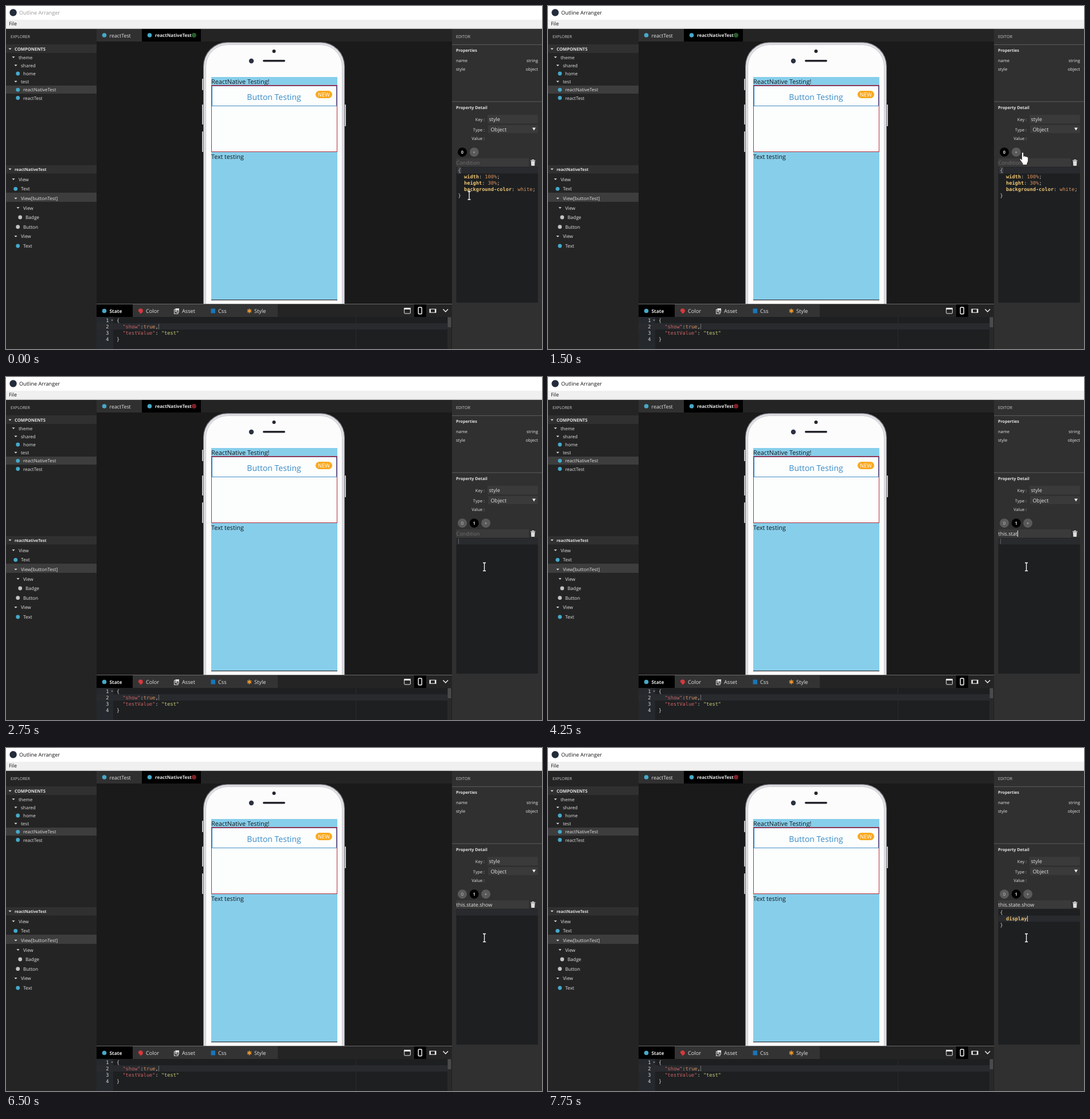
An HTML page for the animation above (8 s loop, 935 by 599 pixels).

```html
<!DOCTYPE html>
<html lang="en">
<head>
<meta charset="utf-8">
<title>Outline Arranger</title>
<style>
html, body { margin: 0; width: 100%; height: 100%; overflow: hidden; background: #1a1a1a; }
svg { display: block; width: 100vw; height: 100vh; }
text { font-family: "Open Sans", "Noto Sans", sans-serif; text-rendering: geometricPrecision; white-space: pre; fill: #e4e4e4; }
.b { font-weight: 700; }
.code text { font: 8.65px "DejaVu Sans Mono", monospace; fill: #d5d8d6; }
.code .key { font-weight: 700; fill: #f0c674; }
.code .val { fill: #de935f; }
.code .red { fill: #cc6666; }
.code .str { fill: #c9cf78; }
.hide { display: none; }
</style>
</head>
<body>
<svg id="stage" viewBox="0 0 935 599" preserveAspectRatio="none"></svg>
<script>
const rect = (x, y, w, h, fill, more = '') =>
  `<rect x="${x}" y="${y}" width="${w}" height="${h}" fill="${fill}" ${more}/>`;
const dot = (x, y, r, fill, more = '') => `<circle cx="${x}" cy="${y}" r="${r}" fill="${fill}" ${more}/>`;
const text = (x, y, size, str, more = '') => `<text x="${x}" y="${y}" font-size="${size}" ${more}>${str}</text>`;
const path = (d, more) => `<path d="${d}" ${more}/>`;
const fill = color => `style="fill:${color}"`;
const bold = 'class="b"', end = 'text-anchor="end"', mid = 'text-anchor="middle"';
const fold = (x, y) => path(`M${x - 2.6} ${y - 1.3}h5.2l-2.6 2.8z`, 'fill="#ddd"');
const blue = '#46a9c9', pale = '#c4c4c4';

// Each row: indent, centre y, label, icon colour (none means a folding arrow)
const tree = (rows, size) => rows.map(([x, y, label, icon]) =>
  (icon ? dot(x - 9.3, y, 3.4, icon) : fold(x - 9, y)) + text(x, y + 3, size, label)).join('');

const titleBar = () =>
  rect(0, 0, 935, 24, '#fff') + rect(0, 24, 935, 16, '#f0f0f0') + rect(0, 38.5, 935, 1.5, '#d4d4d4') +
  dot(12.5, 11.5, 6.2, '#232c3b') +
  text(23, 15, 9.1, 'Outline Arranger', 'id="title"') +
  text(5, 34.3, 8.9, 'File', fill('#111'));

const explorer = () =>
  rect(0, 40, 158, 559, '#242424') + text(8, 55.8, 7.05, 'EXPLORER', fill('#ccc')) +
  rect(0, 67, 158, 15, '#303030') + fold(7, 75) + text(15, 77.6, 7.6, 'COMPONENTS', bold) +
  rect(0, 139, 158, 14, '#3d3d3d') +
  tree([[22, 89.5, 'theme'], [26, 103.7, 'shared'], [30, 118, 'home', blue], [26, 132, 'test'],
    [30, 146.3, 'reactNativeTest', blue], [30, 160.5, 'reactTest', blue]], 8) +
  rect(0, 278, 158, 14.5, '#303030') + fold(7, 285) + text(15, 287.8, 7, 'reactNativeTest', bold) +
  rect(0, 326, 158, 16, '#3d3d3d') +
  tree([[22, 302.6, 'View'], [26, 319.3, 'Text', blue], [26, 336, 'View[buttonTest]'], [30, 352.5, 'View'],
    [34, 369, 'Badge', pale], [30, 385.7, 'Button', pale], [26, 402.3, 'View'], [30, 419, 'Text', blue]], 8.2);

const phone = () =>
  rect(342, 127, 4, 20, '#c8c8cc', 'rx="1"') + rect(342, 172, 4, 35, '#c8c8cc', 'rx="1"') +
  rect(342, 219, 4, 36, '#c8c8cc', 'rx="1"') + rect(589, 172, 4, 38, '#c8c8cc', 'rx="1"') +
  rect(344, 63, 247, 560, '#85858c', 'rx="42"') +
  rect(345.2, 64.4, 244.6, 560, '#e3e3e7', 'rx="41"') +
  rect(348.5, 67.5, 238, 560, '#fcfcfd', 'rx="38" stroke="#c3c3ca"') +
  dot(467.5, 79, 3, '#24262c') + dot(428, 96, 4.2, '#2b3142') + rect(448, 94, 39, 3.6, '#24262c', 'rx="1.8"') +
  rect(358, 124, 220, 389, '#87ceeb') + rect(358, 512.8, 220, 1.2, '#333') +
  text(358, 136, 10.85, 'ReactNative Testing!', fill('#151515')) +
  rect(358.5, 138.5, 219, 116, '#fcfdfd', 'stroke="#b52f38"') +
  rect(359.5, 139.5, 217, 35, 'none', 'stroke="#3f8fc4"') +
  path('M359 139.5H577V173', 'fill="none" stroke="#64407c"') +
  text(467.5, 163.8, 14, 'Button Testing', `${mid} ${fill('#388bc6')}`) +
  rect(540, 148, 29, 13, '#f9a81f', 'rx="6.5"') +
  text(554.5, 157.9, 9.3, 'NEW', `${mid} ${fill('#fff')}`) +
  text(358, 267.3, 10.7, 'Text testing', fill('#151515'));

const workspace = () =>
  rect(158, 40, 620, 480, '#1a1a1a') + rect(158, 40, 620, 22, '#242424') + rect(158, 40, 79, 22, '#303030') +
  rect(237, 40, 103, 22, '#000') +
  dot(171.5, 51, 3.8, blue) + text(180.5, 54.5, 8.85, 'reactTest') +
  dot(250.5, 51, 3.8, blue) + text(260, 54.3, 8.05, 'reactNativeTest', bold) +
  dot(328, 51, 4, '#285c2c', 'id="status"') + phone();

const line = (x, y, parts) => `<text x="${x}" y="${y}">` +
  parts.map(([str, cls]) => `<tspan class="${cls || ''}">${str}</tspan>`).join('') + '</text>';

const statePanel = () =>
  rect(158, 520, 620, 79, '#242424') + rect(158, 520, 620, 1, '#6a6a6a') +
  rect(221, 521, 253, 22, '#333') + rect(158, 521, 63, 22, '#000') +
  dot(171.5, 532.5, 3.8, blue) + text(180.5, 535.7, 8.4, 'State', bold) +
  path('M231 530q3-3 7-.5q2 4-1 6.5q-3 2-4-.5q.5-2-2-2z', 'fill="#d7393d"') + text(244, 536, 9.2, 'Color') +
  rect(293.5, 530, 6.5, 7.5, 'none', 'stroke="#ddd"') + rect(295.5, 528, 6.5, 7, '#ddd') +
  path('M296.5 534l2-3 1.2 1.5 1-1 1 2.5z', 'fill="#444"') + text(307, 536, 9.2, 'Asset') +
  rect(357.5, 528.5, 7.5, 8, '#1976b8') + text(370, 536, 9.2, 'Css') +
  path('M424.5 528.5v8M421 530.5l7 4M428 530.5l-7 4', 'stroke="#f39a2b" stroke-width="1.7"') +
  text(433, 536, 9.2, 'Style') +
  rect(712, 521, 21, 22, '#000') +
  rect(694.8, 527.5, 10.6, 9.5, 'none', 'stroke="#eee" rx="1"') + rect(694.5, 527, 11.2, 3, '#eee') +
  rect(719.3, 526.3, 6, 11.4, 'none', 'stroke="#fff" stroke-width="1.4" rx="1"') +
  rect(739, 529.3, 11, 6, 'none', 'stroke="#eee"') + rect(739, 529.3, 2, 6, '#eee') + rect(748, 529.3, 2, 6, '#eee') +
  path('M762.5 529.5l4.3 4.5 4.3-4.5', 'fill="none" stroke="#eee" stroke-width="1.5"') +
  rect(158, 543, 620, 56, '#1d1f21') + rect(158, 543, 29, 56, '#25282c') +
  rect(158, 554, 612, 11, '#282a2e') + rect(610, 543, 1, 56, '#292b2e') +
  rect(770, 543, 7, 56, '#292929') + rect(770.5, 543.5, 6, 17.5, '#4b4b4b') +
  '<g class="code">' +
  [1, 2, 3, 4].map(n => `<text x="174.3" y="${541 + 11.1 * n}" class="b">${n}</text>`).join('') +
  line(193, 552.1, [['{']]) +
  line(203.4, 563.2, [['"show"', 'red'], [':'], ['true', 'val'], [',']]) +
  line(203.4, 574.3, [['"testValue"', 'red'], [': '], ['"test"', 'str']]) +
  line(193, 585.4, [['}']]) + '</g>' +
  path('M183 547.8h4l-2 2.4z', 'fill="#888"') + rect(266, 555, 1, 9.5, '#777');

const knob = (x, label, on) => dot(x, 255.2, 8, on ? '#000' : '#5a5a5a') +
  text(x, 258, 7.5, label, `${mid} ${on ? bold : fill('#ccc')}`);

const decl = (y, name, value) => line(799, y, [[name, 'key'], [': '], [value, 'val'], [';']]);

const editor = () =>
  rect(778, 40, 157, 559, '#303030') + text(785, 55.8, 7.1, 'EDITOR', fill('#ccc')) +
  rect(778, 67, 157, 1, '#5c5c5c') + rect(778, 166.5, 157, 1, '#5c5c5c') +
  text(785, 80.2, 7.1, 'Properties', bold) +
  text(785, 97.8, 7.5, 'name') + text(928, 97.8, 7.5, 'string', end) +
  text(785, 113, 7.5, 'style') + text(928, 113, 7.5, 'object', end) +
  text(785, 179.8, 7.2, 'Property Detail', bold) +
  text(835, 200.5, 7.4, 'Key :', end) + text(835, 218.6, 7.4, 'Type :', end) + text(835, 233.6, 7.4, 'Value :', end) +
  rect(840, 190, 88, 15, '#3a3a3a') + text(842.5, 200.8, 9, 'style') +
  rect(841, 208, 87, 14, '#3a3a3a') + text(845.5, 219, 9.1, 'Object') +
  path('M918 212.5h6l-3 5z', 'fill="#eee"') +
  rect(785, 266, 127, 14.5, '#3a3a3a') +
  path('M915 269.2h8.4v1.2H915zM917.5 268h3.4v1.4h-3.4zM915.8 271h6.8l-.5 8h-5.8z', 'fill="#ddd"') +
  rect(785.5, 281, 142.5, 237, '#1d1f21') +
  rect(785.5, 281.5, 142.5, 11, '#282a2e', 'id="active"') +
  '<g id="before" class="code">' + rect(788.5, 282, 5, 10, 'none', 'stroke="#484b50"') +
  line(788.5, 290, [['{']]) + decl(301.1, 'width', '100%') + decl(312.2, 'height', '30%') +
  decl(323.3, 'background-color', 'white') + line(788.5, 334.4, [['}']]) + '</g>' +
  `<g id="knobsBefore">${knob(796, '0', true) + knob(816.7, '+')}</g>` +
  `<g id="knobsAfter">${knob(796, '0') + knob(816.7, '1', true) + knob(837, '+')}</g>` +
  text(785.5, 277, 9, '', 'id="condition"') + rect(0, 268, 1, 11, '#eee', 'id="conditionCaret"') +
  '<g class="code"><text id="open" x="788.5" y="290"></text><text id="word" x="799" y="301.1"></text>' +
  '<text id="close" x="788.5" y="312.2"></text></g>' + rect(0, 0, 1, 10, '#777', 'id="codeCaret"');

const pointers = () =>
  `<g id="beam">${path('M-2.5-7h2l.5.6.5-.6h2M0-6.4V6.4M-2.5 7h2l.5-.6.5.6h2', 'fill="none" stroke="#fff" stroke-width="1.3"')}</g>` +
  `<g id="arrow">${path('M0 0v15.5l3.6-3.4 2.5 5.8 2.5-1.1-2.5-5.6h5z', 'fill="#fff" stroke="#111" stroke-width=".8"')}</g>` +
  `<g id="hand">${path('M-1.6 1q1.6-2 3.2 0v6q2-1.5 3 .5q2-1 2.7.7q2-.6 2.3 1.2v6l-1.8 4v2.6H-.2V19.5l-5-7q.5-2.4 2.6-1l1 1.4z',
    'fill="#fff" stroke="#111" stroke-width=".8"')}</g>`;

const stage = document.getElementById('stage');
stage.innerHTML = workspace() + explorer() + statePanel() + editor() + titleBar() + pointers();
const $ = id => document.getElementById(id);
const show = (id, on) => $(id).classList.toggle('hide', !on);

const pointerSteps = [[0, 'beam', 808, 331], [500, 'arrow', 822, 292], [750, 'arrow', 811.5, 266],
  [1000, 'hand', 834, 258], [1250, 'hand', 825, 256], [1500, 'hand', 828, 255.5],
  [2250, 'arrow', 835, 282], [2500, 'beam', 835, 322], [2750, 'beam', 834.5, 331.5]];
const conditionSteps = [[0, ''], [3250, 't'], [3500, 'thi'], [3750, 'this.'], [4000, 'this.s'], [4250, 'this.stat'],
  [4500, 'this.state'], [4750, 'this.state.s'], [5000, 'this.state.show']];
const codeSteps = [[0, '', '', ''], [6750, '{}', '', ''], [7000, '{', '', '}'], [7250, '{', 'di', '}'],
  [7500, '{', 'disp', '}'], [7750, '{', 'display', '}']];
const at = (steps, t) => steps.filter(step => step[0] <= t).pop();

function render(t) {
  const clicked = t >= 2000, focus = t >= 5500, multiline = t >= 7000;
  $('title').style.fill = t < 250 ? '#999' : '#111';
  $('status').setAttribute('fill', clicked ? '#7e2026' : '#285c2c');
  show('before', !clicked);
  show('knobsBefore', !clicked);
  show('knobsAfter', clicked);

  const [, kind, x, y] = at(pointerSteps, t);
  for (const id of ['beam', 'arrow', 'hand']) show(id, id === kind);
  $(kind).setAttribute('transform', `translate(${x} ${y})`);

  const typed = at(conditionSteps, t)[1], condition = $('condition');
  condition.textContent = typed || 'Condition';
  condition.style.fill = typed ? '#e4e4e4' : '#707070';
  show('conditionCaret', typed && !focus);
  $('conditionCaret').setAttribute('x', 785.5 + (typed ? condition.getComputedTextLength() : 0));

  const [, open, word, close] = at(codeSteps, t);
  $('open').textContent = open;
  $('word').textContent = word;
  $('close').textContent = close;
  $('word').setAttribute('class', word === 'display' ? 'key' : '');
  $('active').setAttribute('y', multiline ? 292.6 : 281.5);
  const caret = $('codeCaret');
  show('codeCaret', clicked && !(t >= 6500 && t < 6750));
  caret.setAttribute('fill', focus ? '#ddd' : '#5c5e61');
  caret.setAttribute('x', multiline ? 799.4 + word.length * 5.21 : open ? 794 : 789);
  caret.setAttribute('y', multiline ? 293 : 282);
}

const start = performance.now();
function frame() {
  render((performance.now() - start) % 8000);
  requestAnimationFrame(frame);
}
frame();
</script>
</body>
</html>
```
